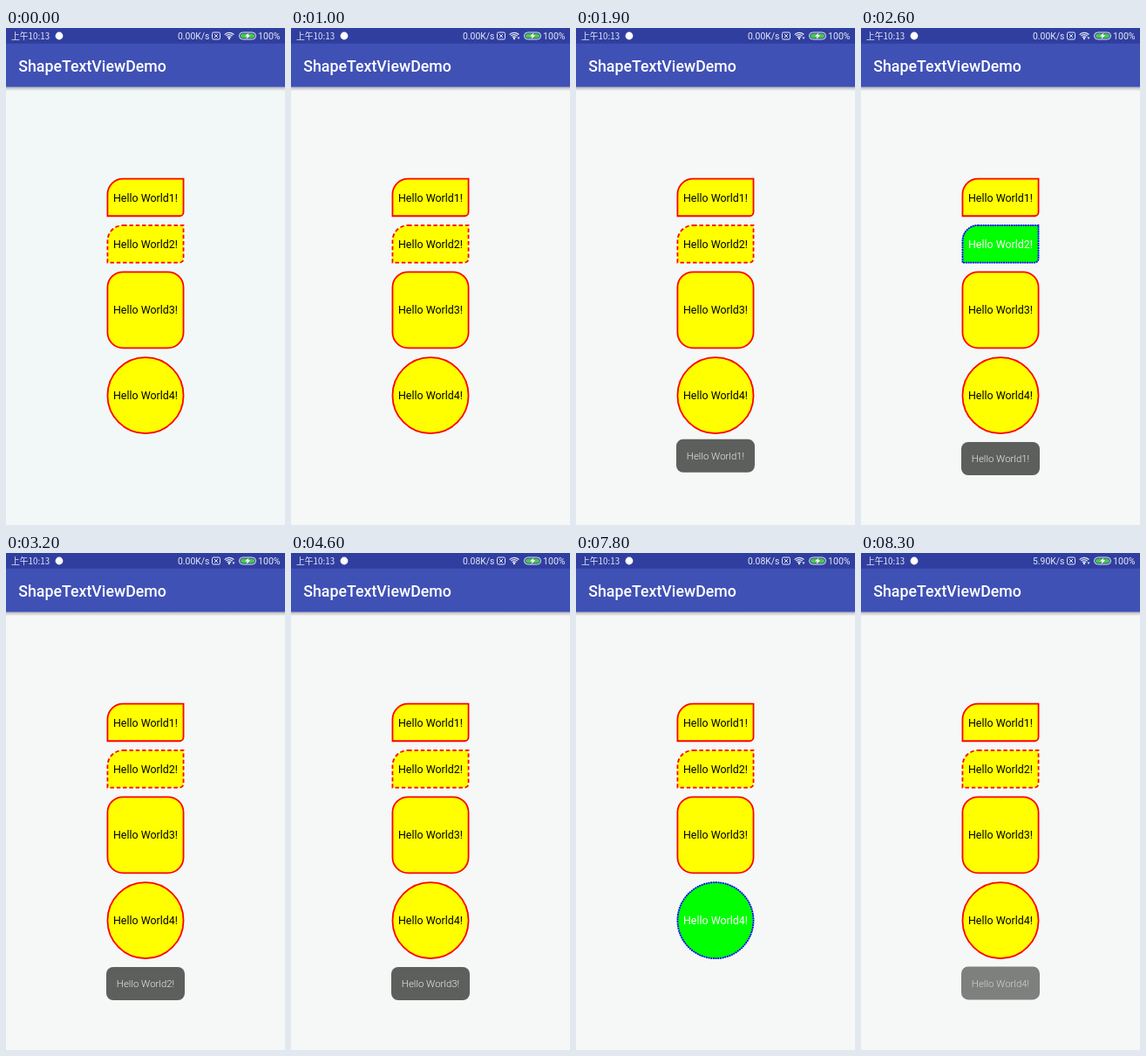
Animation of 320x569 px, one loop 8400 ms. Source, as an HTML page with a canvas:

```html
<!DOCTYPE html>
<html lang="zh">
<head>
<meta charset="utf-8">
<title>ShapeTextViewDemo</title>
<style>
  html, body { margin: 0; width: 100%; height: 100%; overflow: hidden; background: #f5f8f6; }
  canvas { display: block; width: 320px; height: 569px; }
</style>
</head>
<body>
<canvas id="stage"></canvas>
<script>
const W = 320, H = 569, LOOP = 8400, STEP = 100;
const DP = 320 / 360;
const canvas = document.getElementById('stage');
const ctx = canvas.getContext('2d');
const ratio = window.devicePixelRatio || 1;
canvas.width = Math.round(W * ratio);
canvas.height = Math.round(H * ratio);

const ROBOTO = 'Roboto, sans-serif';
const CJK = '"Noto Sans CJK SC", "Noto Sans CJK JP", "Noto Sans CJK", sans-serif';
const LIGHT = '#e6e9f6';

const CUT = [20 * DP, 0, 5 * DP, 0];
const SIDE = 100 * DP;
const LEFT = (W - SIDE) / 2;
const views = [
  { y: 171.7, h: SIDE / 2, radii: CUT, press: [1200, 1500] },
  { y: 225.0, h: SIDE / 2, radii: CUT, dash: [5 * DP, 3.2 * DP], press: [2600, 3000] },
  { y: 278.4, h: SIDE, radii: 20 * DP, press: [3900, 4500] },
  { y: 376.2, h: SIDE, radii: SIDE / 2, press: [6500, 7900] }
];

const within = (t, [from, to]) => t >= from && t < to;
const clamp01 = v => Math.max(0, Math.min(1, v));

function text(str, x, y, font, color, align = 'left') {
  ctx.font = font;
  ctx.fillStyle = color;
  ctx.textAlign = align;
  ctx.fillText(str, x, y);
}

function roundBox(x, y, w, h, radii) {
  ctx.beginPath();
  ctx.roundRect(x, y, w, h, radii);
}

function line(...points) {
  ctx.beginPath();
  points.forEach(([x, y]) => ctx.lineTo(x, y));
}

function drawSim() {
  ctx.lineWidth = 1;
  roundBox(236.5, 5, 9, 8, 1.5);
  ctx.stroke();
  line([239, 7], [243, 11]);
  ctx.stroke();
  line([243, 7], [239, 11]);
  ctx.stroke();
}

function drawWifi(active) {
  ctx.lineWidth = 1.3;
  for (const r of [2.8, 5, 7.3]) {
    ctx.beginPath();
    ctx.arc(256, 12.6, r, -Math.PI * 0.76, -Math.PI * 0.24);
    ctx.stroke();
  }
  ctx.beginPath();
  ctx.arc(256, 12, 1.2, 0, 7);
  ctx.fill();
  if (active) {
    line([259.5, 10.5], [262.5, 10.5], [261, 13]);
    ctx.fill();
  }
}

function drawBattery() {
  ctx.lineWidth = 1;
  roundBox(267.5, 5, 19, 8, 4);
  ctx.stroke();
  ctx.fillStyle = '#48c84c';
  roundBox(269, 6.5, 16, 5, 2.5);
  ctx.fill();
  ctx.fillStyle = '#fff';
  line([278.5, 5.5], [274, 9.5], [276.7, 9.5], [275.6, 12.8], [280.2, 8.3], [277.5, 8.3]);
  ctx.fill();
}

function drawBars(t) {
  const bottom = 67.6;
  const shade = ctx.createLinearGradient(0, bottom, 0, bottom + 4.5);
  shade.addColorStop(0, 'rgba(0,0,0,.26)');
  shade.addColorStop(1, 'rgba(0,0,0,0)');
  ctx.fillStyle = shade;
  ctx.fillRect(0, bottom, W, 4.5);
  ctx.fillStyle = '#3f51b5';
  ctx.fillRect(0, 0, W, bottom);
  ctx.fillStyle = '#303f9f';
  ctx.fillRect(0, 0, W, 17.8);

  text('ShapeTextViewDemo', 14.2, 49.5, `500 ${20 * DP}px ${ROBOTO}`, '#fff');
  text('上午10:13', 6, 13, `9.8px ${CJK}`, LIGHT);
  const speed = t < 4000 ? '0.00' : t < 8000 ? '0.08' : '5.90';
  text(speed + 'K/s', 197, 13, `10.4px ${ROBOTO}`, LIGHT);
  text('100%', 289, 13, `10.6px ${ROBOTO}`, LIGHT);

  ctx.fillStyle = '#fff';
  ctx.beginPath();
  ctx.arc(61, 9, 4.4, 0, 7);
  ctx.fill();
  ctx.fillStyle = ctx.strokeStyle = LIGHT;
  drawSim();
  drawWifi(within(t, [900, 3600]) || t >= 7800);
  drawBattery();
}

function drawView(view, index, t) {
  const pressed = within(t, view.press);
  const stroke = 2 * DP, inset = stroke / 2;
  roundBox(LEFT + inset, view.y + inset, SIDE - stroke, view.h - stroke, view.radii);
  ctx.fillStyle = pressed ? '#0f0' : '#ff0';
  ctx.fill();
  ctx.strokeStyle = pressed ? '#00f' : '#f00';
  ctx.lineWidth = stroke;
  ctx.setLineDash(pressed ? [2, 0.7] : view.dash || []);
  ctx.stroke();
  ctx.setLineDash([]);
  text(`Hello World${index + 1}!`, W / 2, view.y + view.h / 2 + 4.6,
    `${14 * DP}px ${ROBOTO}`, pressed ? '#fff' : '#000', 'center');
}

function toastState(t) {
  const second = t >= 7100;
  const age = t - (second ? 8145 : 1710);
  if (age < 0) return null;
  // damped spring, then a linear fade
  const lift = age > 450 ? 0 : 48 * Math.exp(-age / 106) * Math.cos(age * Math.PI / 300);
  const alpha = second ? clamp01(age / 200)
    : Math.min(clamp01(age / 190), clamp01((7000 - t) / 500));
  const number = second ? 4 : t < 3100 ? 1 : t < 4600 ? 2 : 3;
  return { lift, alpha, number };
}

function drawToast(t) {
  const toast = toastState(t);
  if (!toast || toast.alpha === 0) return;
  ctx.save();
  ctx.globalAlpha = toast.alpha;
  ctx.translate(0, toast.lift);
  ctx.fillStyle = '#5c5f5c';
  roundBox(115, 474, 90, 38, 8);
  ctx.fill();
  text(`Hello World${toast.number}!`, W / 2, 497.4, `300 11.4px ${ROBOTO}`, '#eceeec', 'center');
  ctx.restore();
}

function draw(t) {
  ctx.setTransform(ratio, 0, 0, ratio, 0, 0);
  ctx.fillStyle = t < 900 ? '#f2f8f8' : '#f5f8f6';
  ctx.fillRect(0, 0, W, H);
  drawBars(t);
  views.forEach((view, i) => drawView(view, i, t));
  drawToast(t);
}

const start = performance.now();
function frame() {
  const elapsed = (performance.now() - start) % LOOP;
  draw(Math.floor(elapsed / STEP) * STEP);
  requestAnimationFrame(frame);
}
frame();
</script>
</body>
</html>
```
